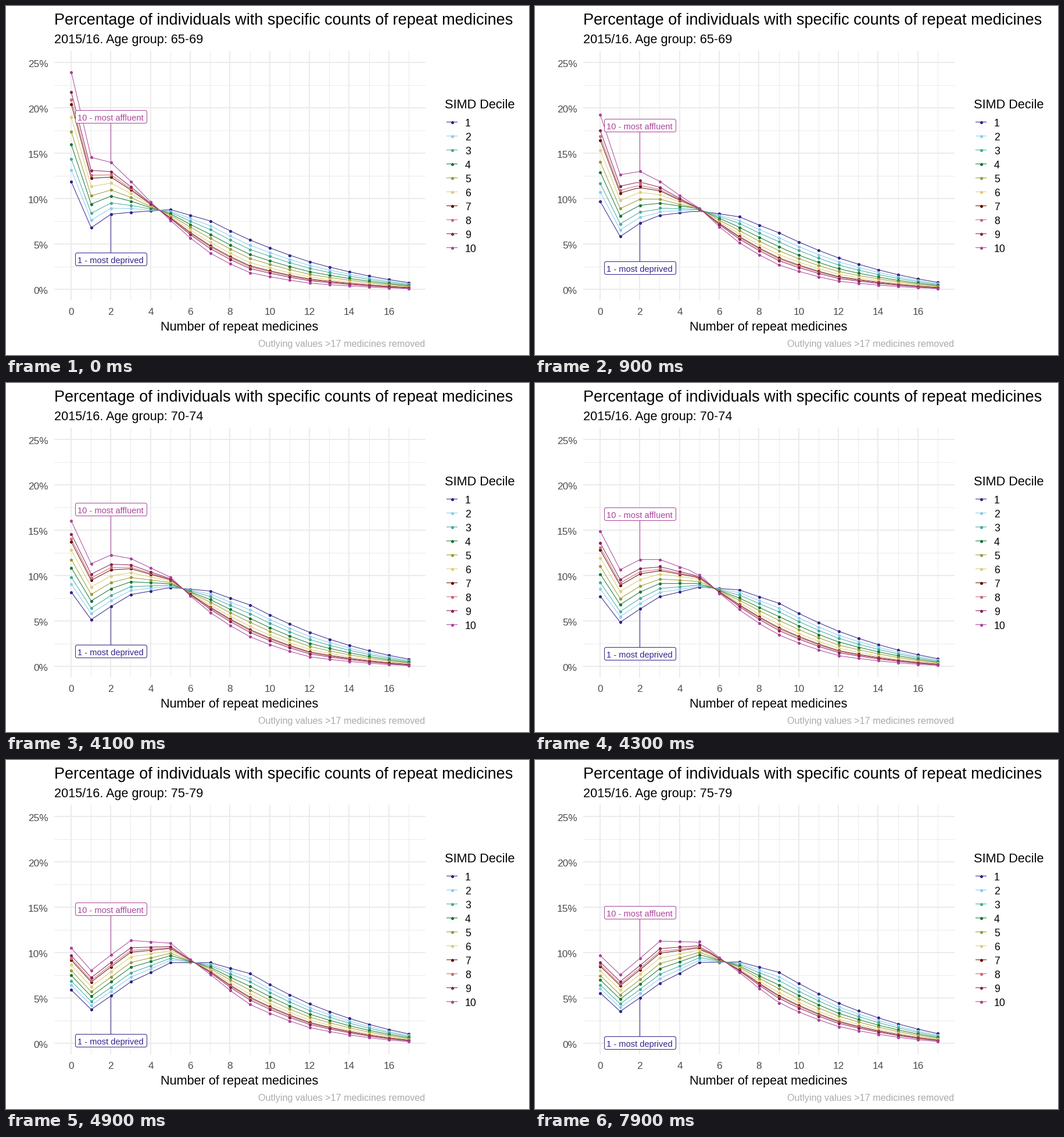
Write a matplotlib script that moves like this. It is 900 by 600 pixels and loops after 8 s.

```python
import matplotlib.pyplot as plt
import numpy as np
from matplotlib.animation import FuncAnimation
from matplotlib.patches import FancyBboxPatch

plt.rcParams["font.family"] = ["Liberation Sans", "DejaVu Sans"]

PX = 0.72  # points per pixel at 100 dpi
GRID, TICK = "#EBEBEB", "#4D4D4D"
COLORS = ["#332288", "#88CCEE", "#44AA99", "#117733", "#999933",
          "#DDCC77", "#661100", "#CC6677", "#882255", "#AA4499"]
AGES = ["65-69", "70-74", "75-79", "80-84"]
COUNTS = np.arange(18)

# Key points of the most deprived and the most affluent decile, in percent
KNOTS = [0, 1, 2, 3, 5, 7, 9, 12, 17]
OUTER = [
    ([11.85, 6.8, 8.3, 8.5, 8.8, 7.55, 5.45, 3.05, .75],
     [23.95, 14.55, 14, 11.9, 7.6, 4, 1.85, .7, .1]),
    ([8.25, 5.2, 6.65, 7.95, 8.7, 8.3, 6.75, 3.75, .8],
     [16.15, 11.4, 12.35, 11.9, 9.8, 5.9, 3.25, 1.05, .1]),
    ([5.9, 3.75, 5.25, 6.8, 8.9, 8.9, 7.7, 4.35, 1.05],
     [10.5, 8.05, 9.75, 11.35, 11.05, 7.6, 4.3, 1.75, .2]),
]
AFFLUENCE = np.array([0, .13, .24, .38, .5, .63, .74, .78, .84, 1])[:, None]


def all_deciles(first, last):
    """Blend between the outer deciles on a square-root scale."""
    low, high = (np.interp(COUNTS, KNOTS, np.sqrt(v)) for v in (first, last))
    return (low + AFFLUENCE * (high - low)) ** 2


STATES = [all_deciles(*pair) for pair in OUTER]
STATES.append(STATES[2] + .65 * (STATES[2] - STATES[1]))


def enrich(ys):
    """Resample to 50 vertices: thirds of each edge, halves of the two flattest."""
    parts = np.full(17, 3)
    parts[np.argsort(np.abs(np.diff(ys)), kind="stable")[:2]] = 2
    xs = np.concatenate([i + np.arange(n) / n for i, n in enumerate(parts)] + [[17]])
    return np.array([xs, np.interp(xs, COUNTS, ys)])


PATHS = [np.array([enrich(ys) for ys in state]) for state in STATES]


def px_x(count):
    return 112.4 + 34.18 * count


def px_y(percent):
    return 487.4 - 15.61 * percent


fig = plt.figure(figsize=(9, 6), dpi=100, facecolor="white")
ax = fig.add_axes([0, 0, 1, 1])
ax.set_xlim(0, 900)
ax.set_ylim(600, 0)
ax.axis("off")


def stroke(xs, ys, color, width=1, z=2):
    return ax.plot(xs, ys, color=color, lw=width * PX, zorder=z, snap=False,
                   solid_capstyle="butt", solid_joinstyle="round")[0]


def dots(xs, ys, color):
    return ax.plot(xs, ys, "o", color=color, ms=5.2 * PX, mew=0, zorder=3,
                   snap=False)[0]


def write(x, y, text, size, color="black", ha="left"):
    return ax.text(x, y, text, fontsize=size * PX, color=color, ha=ha,
                   va="baseline", zorder=6)


# Grid and axes: two-pixel major lines, one-pixel minor lines
for pct in np.arange(0, 25.1, 2.5):
    y, major = int(px_y(pct)), pct % 5 == 0
    y_line = y if major else y + .5
    stroke([83, 722], [y_line, y_line], GRID, 1 + major, 1)
    if major:
        write(72.5, y + 8, f"{pct:.0f}%", 17.3, TICK, "right")
for count in COUNTS:
    x, major = int(px_x(count)), count % 2 == 0
    x_line = x if major else x + .5
    stroke([x_line, x_line], [77, 506], GRID, 1 + major, 1)
    if major:
        write(x, 531, str(count), 17.3, TICK, "center")

write(83, 32, "Percentage of individuals with specific counts of repeat medicines", 27.1)
subtitle = write(83, 64, "", 21.6)
write(402, 558, "Number of repeat medicines", 21.6, ha="center")
write(721.5, 586, "Outlying values >17 medicines removed", 16.1, "#AAAAAA", "right")

# Legend
write(755, 176, "SIMD Decile", 21.8)
for i, color in enumerate(COLORS):
    y = 199.5 + 24 * i
    stroke([758, 777], [y, y], color)
    dots([767.5], [y], color)
    write(790, y + 7.5, str(i + 1), 17.6)

lines = [stroke([], [], c) for c in COLORS]
points = [dots([], [], c) for c in COLORS]


class Callout:
    """Boxed label held five percentage points away from a decile's curve."""

    def __init__(self, decile, text, offset):
        color = COLORS[decile]
        self.decile, self.offset = decile, offset
        self.stem = stroke([], [], color, z=4)
        self.box = FancyBboxPatch((119.5, 0), 123, 22, fc="white", ec=color, lw=PX,
                                  boxstyle="round,pad=0,rounding_size=3", zorder=5)
        ax.add_patch(self.box)
        self.text = write(180.2, 0, text, 14.6, color, "center")

    def place(self, values):
        anchor = values[self.decile, 2]
        y = round(px_y(anchor + self.offset))
        self.stem.set_data([180.5, 180.5], [px_y(anchor), y])
        self.box.set_y(y - 11.5)
        self.text.set_y(y + 6)


callouts = [Callout(0, "1 - most deprived", -5), Callout(9, "10 - most affluent", 5)]


def ease(t):
    return 2 * t * t if t < .5 else 1 - 2 * (1 - t) ** 2


def update(frame):
    # Nine moving steps, then a rest, every 36 frames
    group, step = divmod(max(frame - 4, 0), 36)
    step = min(step, 9)
    w = ease(step / 9)
    values = (1 - w) * STATES[group] + w * STATES[group + 1]
    paths = (1 - w) * PATHS[group] + w * PATHS[group + 1]
    for line, dot, path, ys in zip(lines, points, paths, values):
        line.set_data(px_x(path[0]), px_y(path[1]))
        dot.set_data(px_x(COUNTS), px_y(ys))
    for callout in callouts:
        callout.place(values)
    subtitle.set_text(f"2015/16. Age group: {AGES[group + (step > 5)]}")
    return []


anim = FuncAnimation(fig, update, frames=80, interval=100, repeat=True, repeat_delay=0)
plt.show()
```
